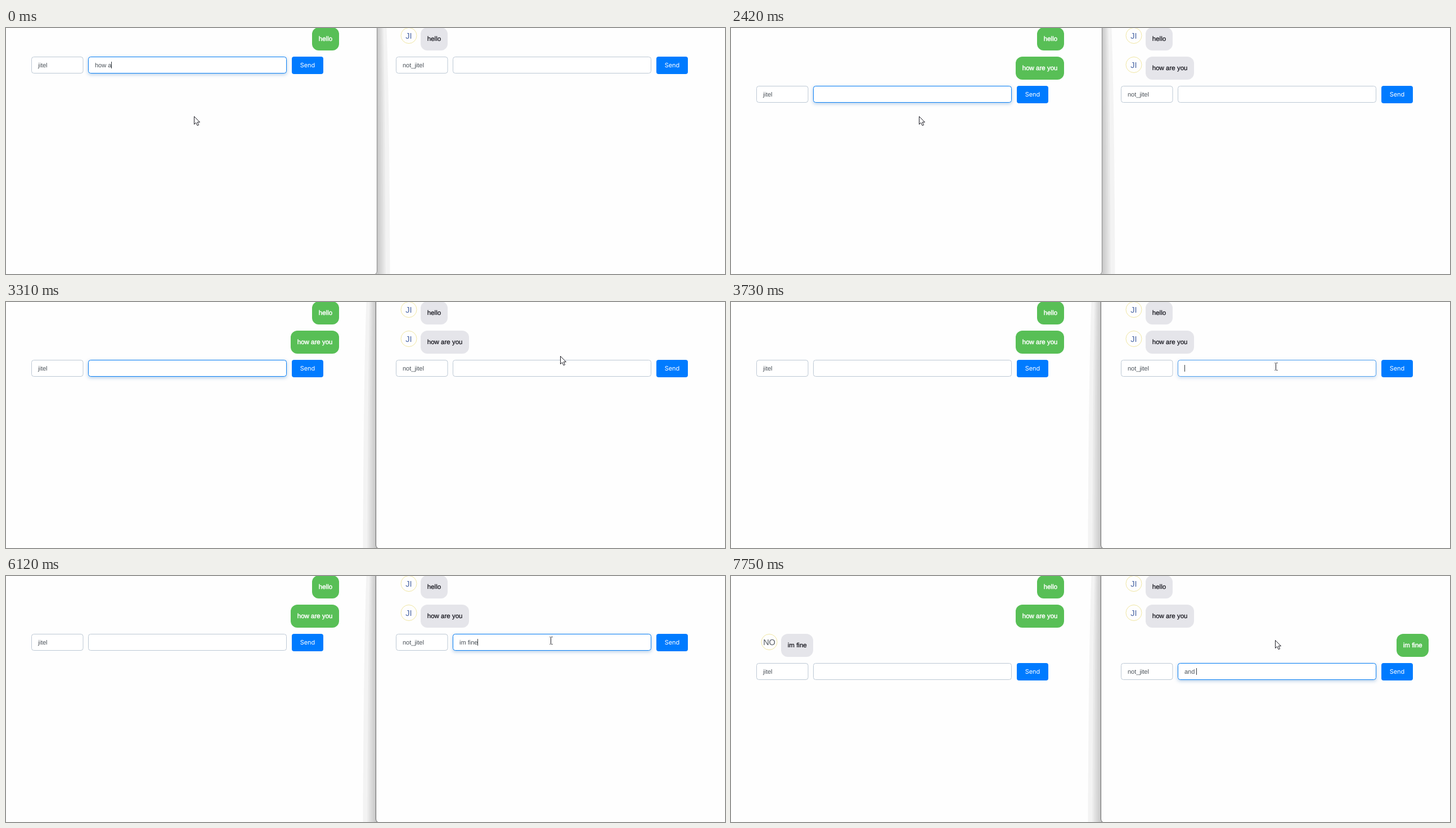
These frames come from a looping animation (1278x438 px, 8 s). An HTML page with a canvas:

```html
<!DOCTYPE html>
<html lang="en">
<head>
<meta charset="utf-8">
<title>Two chat windows</title>
<style>
html, body { margin: 0; width: 100%; height: 100%; overflow: hidden; background: #fefefe; }
canvas { display: block; }
</style>
</head>
<body>
<canvas id="stage" width="1278" height="438"></canvas>
<script>
const ctx = document.getElementById('stage').getContext('2d');
const SANS = '"Liberation Sans", Arial, sans-serif';
const LOOP = 8000, ROW = 52, PANEL = 648;
const SWAP = 3250, SENT = 2420, REPLIED = 6370;

// Contents of the message fields; a trailing bar is the caret.
const leftTyping = [
  [0, 'how a|'], [180, 'how ar|'], [330, 'how are|'], [450, 'how are |'],
  [820, 'how are y|'], [1380, 'how are y'], [1500, 'how are yo|'],
  [1630, 'how are you|'], [2150, 'how are you'], [SENT, ''], [2670, '|'], [3190, '']
];
const rightTyping = [
  [0, ''], [3610, '|'], [4190, ''], [4500, 'i|'], [4750, 'im|'], [4880, 'im |'],
  [5380, 'im '], [5520, 'im f|'], [5650, 'im fi|'], [5800, 'im fin|'],
  [6120, 'im fine|'], [REPLIED, '|'], [6620, ''], [7180, '|'], [7240, 'a|'],
  [7440, 'an|'], [7560, 'and|'], [7750, 'and |']
];
const pointerPath = [[2860, 334, 157], [3310, 985, 96], [3590, 967, 114]];

const messages = [
  { at: 0, text: 'hello', side: 0 },
  { at: SENT, text: 'how are you', side: 0 },
  { at: REPLIED, text: 'im fine', side: 1 }
];
const avatars = [['JI', '#4a66a5'], ['NO', '#555b63']];

const ramp = (t, from, to) => Math.min(1, Math.max(0, (t - from) / (to - from)));
const current = (keys, t) => keys.filter(k => k[0] <= t).pop()[1];

function box(x, y, w, h, r, fill, stroke) {
  ctx.beginPath();
  ctx.roundRect(x, y, w, h, r);
  ctx.fillStyle = fill;
  ctx.fill();
  if (stroke) {
    ctx.strokeStyle = stroke;
    ctx.stroke();
  }
}

function label(text, x, y, size, color, align = 'left', font = SANS) {
  ctx.font = `${size}px ${font}`;
  ctx.textAlign = align;
  ctx.fillStyle = color;
  ctx.fillText(text, x, y);
}

function bubble({ text, side }, y, own) {
  ctx.font = `11.5px ${SANS}`;
  const w = Math.round(ctx.measureText(text).width + 23.5);
  const x = own ? 592 - w : 89;
  const ink = own ? '#fff' : '#0c0c14';
  box(x, y, w, 41, 12, own ? '#58bf56' : '#e5e5ea');
  label(text, x + 11.8, y + 24, 11.5, ink);
  ctx.strokeStyle = ink;
  ctx.lineWidth = own ? 0.45 : 0.2;
  ctx.strokeText(text, x + 11.8, y + 24);
  ctx.lineWidth = 1;
  if (own) return;
  const [initials, color] = avatars[side];
  ctx.beginPath();
  ctx.arc(68, y + 14.5, 14, 0, 7);
  ctx.strokeStyle = '#f0e6a2';
  ctx.stroke();
  label(initials, 68, y + 19.5, 14.5, color, 'center');
}

function messageField(y, typed, focus) {
  ctx.save();
  ctx.globalAlpha = focus;
  ctx.shadowColor = 'rgba(0, 90, 180, .3)';
  ctx.shadowBlur = 6;
  ctx.shadowOffsetY = 2;
  box(146, y, 353, 30, 4, '#fff');
  ctx.restore();
  box(146.5, y + .5, 352, 29, 4, '#fff', '#bcc8d4');
  ctx.globalAlpha = focus;
  box(146.5, y + .5, 352, 29, 4, '#fff', '#0a80f5');
  ctx.globalAlpha = 1;

  const text = typed.replace('|', '');
  label(text, 158, y + 18.5, 11, '#495057');
  if (typed !== text) {
    ctx.fillStyle = '#30363c';
    ctx.fillRect(Math.floor(158 + ctx.measureText(text).width), y + 9, 1, 12);
  }
}

function panel(side, name, shown, typed, focus) {
  const y = shown.length * ROW - 1;
  ctx.save();
  ctx.translate(side * PANEL, 0);
  shown.forEach((m, i) => bubble(m, i * ROW - 1, m.side === side));
  box(45.5, y + .5, 91.5, 29, 4, '#fff', '#bcc8d4');
  label(name, 57, y + 18.5, 11, '#495057');
  messageField(y, typed, focus);
  box(508, y, 56, 31, 4, '#007bff');
  label('Send', 536, y + 18.5, 11, '#fff', 'center', 'Inter, sans-serif');
  ctx.restore();
}

// Edge of the window in front, with its shadow on the one behind.
function windowEdge(x, dir) {
  const bands = [[1, '#f3f3f3'], [.65, '#e9e9e9'], [.5, '#dfdfdf'], [.35, '#d6d6d6'], [.18, '#cbcbcb']];
  for (const [part, color] of bands) {
    const reach = w => x + dir * w * part;
    ctx.beginPath();
    ctx.moveTo(x, 0);
    ctx.lineTo(reach(17), 0);
    ctx.quadraticCurveTo(reach(22), 140, reach(23), 438);
    ctx.lineTo(x, 438);
    ctx.fillStyle = color;
    ctx.fill();
  }
  ctx.beginPath();
  ctx.moveTo(x, 0);
  ctx.lineTo(x, 433);
  ctx.quadraticCurveTo(x, 437, x - dir * 3, 438);
  ctx.lineTo(x, 438);
  ctx.strokeStyle = dir > 0 ? '#858585' : '#626262';
  ctx.stroke();
}

function pointerAt(t) {
  let [, x, y] = pointerPath[0];
  for (let i = 1; i < pointerPath.length; i++) {
    const [end, px, py] = pointerPath[i];
    const k = ramp(t, pointerPath[i - 1][0], end);
    const ease = k * k * (3 - 2 * k);
    x += (px - x) * ease;
    y += (py - y) * ease;
  }
  return [Math.round(x), Math.round(y)];
}

function pointer(t, fieldY) {
  const [x, y] = pointerAt(t);
  const fx = x >= PANEL ? x - PANEL : x;
  const overField = fx >= 146 && fx < 499 && y >= fieldY && y < fieldY + 30;
  ctx.save();
  ctx.translate(x + .5, y + .5);
  ctx.strokeStyle = '#1c1c24';
  ctx.fillStyle = '#fff';
  if (overField) {
    ctx.stroke(new Path2D('M-1 -6H0L1 -5L2 -6H4M1 -5V6M-1 7H0L1 6L2 7H4'));
  } else {
    const arrow = new Path2D('M0 0V14L3.2 11L5.6 16.2L8 15.2L5.7 10.2H10Z');
    ctx.fill(arrow);
    ctx.stroke(arrow);
  }
  ctx.restore();
}

function draw(now) {
  const t = now % LOOP;
  const shown = messages.filter(m => m.at <= t);
  ctx.textRendering = 'geometricPrecision';
  ctx.lineWidth = 1;
  ctx.fillStyle = '#fefefe';
  ctx.fillRect(0, 0, 1278, 438);
  t < SWAP ? windowEdge(659.5, 1) : windowEdge(657.5, -1);
  panel(0, 'jitel', shown, current(leftTyping, t), 1 - ramp(t, 3330, 3450));
  panel(1, 'not_jitel', shown, current(rightTyping, t), ramp(t, 3610, 3790));
  pointer(t, shown.length * ROW - 1);
}

const start = performance.now();
function tick() {
  draw(performance.now() - start);
  requestAnimationFrame(tick);
}
tick();
</script>
</body>
</html>
```
